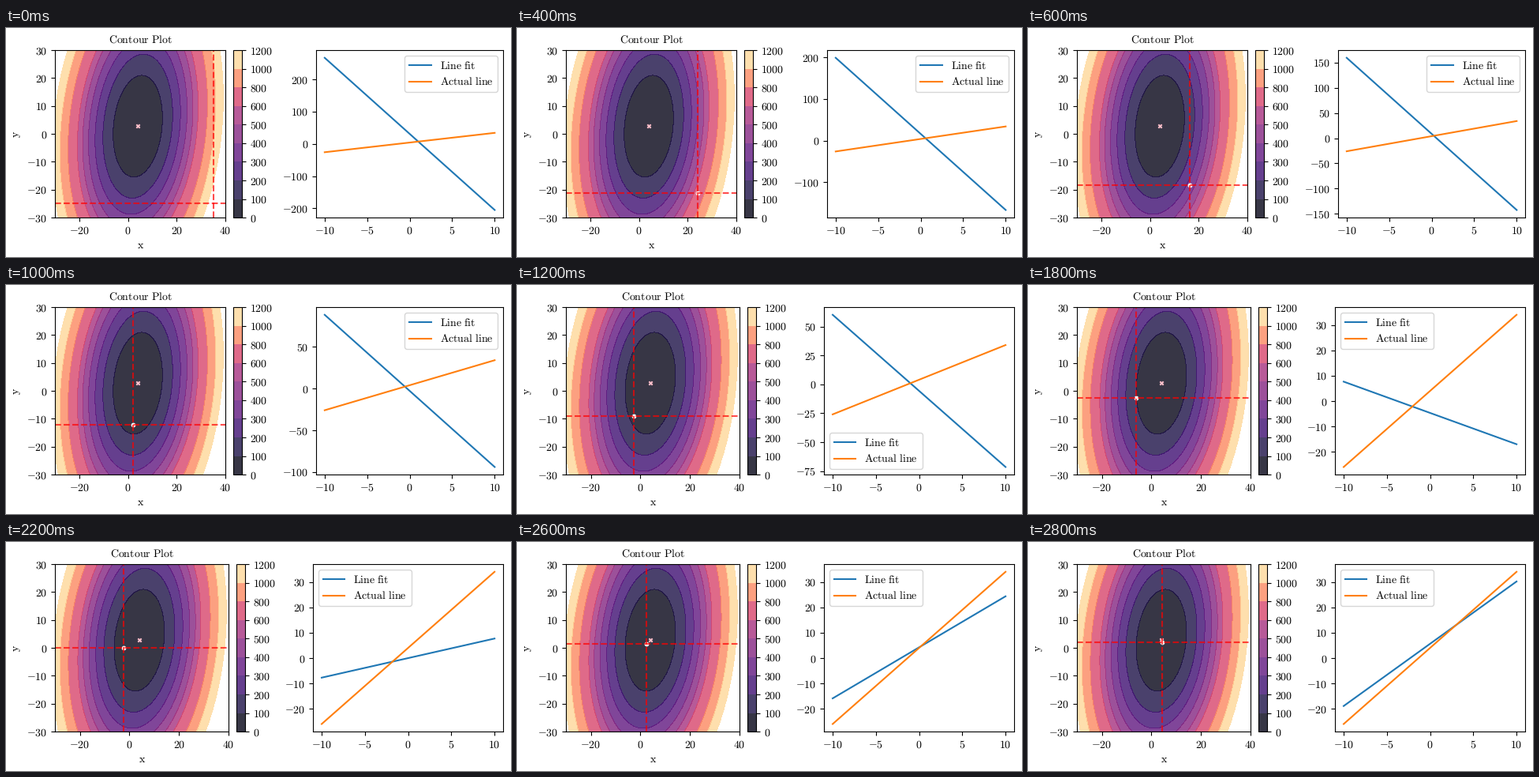
Animation, 640 px wide and 290 px high, one loop 3000 ms. Source, as a matplotlib script:

```python
import numpy as np
import matplotlib.pyplot as plt
from matplotlib.animation import FuncAnimation
from matplotlib.ticker import FuncFormatter

W, H, DPI = 640, 290, 100
FRAMES, INTERVAL = 15, 200
TOP, BOTTOM, RIGHT = 28, 240, 630

plt.rcParams.update({
    "font.family": "Liberation Serif",
    "font.size": 10,
    "axes.titlesize": 10,
    "mathtext.fontset": "cm",
    "text.hinting": "none",
})

# Squared-error bowl over (intercept, slope)
TRUTH = np.array([4.0, 3.0])
CENTER = np.array([4.0, 2.75])
HESS = np.array([[1.0, -0.09], [-0.09, 0.309]])
LEVELS = [0, 100, 200, 300, 400, 500, 600, 800, 1000, 1200]
START, MOMENTUM, RATE = (35.0, -25.0), 0.75, 0.125


def descend(steps):
    pos, vel = np.array(START), np.zeros(2)
    path = [pos]
    for _ in range(steps):
        vel = MOMENTUM * vel - RATE * HESS @ (pos - CENTER)
        pos = pos + vel
        path.append(pos)
    return np.array(path)


def loss(x, y):
    dx, dy = x - CENTER[0], y - CENTER[1]
    return HESS[0, 0] * dx**2 + 2 * HESS[0, 1] * dx * dy + HESS[1, 1] * dy**2


def tex(text):
    return r"$\mathrm{%s}$" % text.replace(" ", r"\ ")


def place(ax, left, right):
    # A small inset keeps the snapped edges on the intended pixels
    ax.set_position([(left + 0.1) / W, (H - BOTTOM - 0.1) / H,
                     (right - left) / W, (BOTTOM - TOP) / H])


number = FuncFormatter(lambda v, _: f"${v + 0.0:g}$")
path = descend(FRAMES)

fig = plt.figure(figsize=(W / DPI, H / DPI), dpi=DPI, facecolor="white")
ax = fig.add_axes([0.1, 0.2, 0.3, 0.7])
cax = fig.add_axes([0.45, 0.2, 0.02, 0.7])
fit_ax = fig.add_axes([0.6, 0.2, 0.35, 0.7])

gx, gy = np.meshgrid(np.linspace(-30, 40, 200), np.linspace(-30, 30, 200))
bowl = ax.contourf(gx, gy, loss(gx, gy), levels=LEVELS, cmap="magma",
                   alpha=0.8, vmin=0, vmax=1200)
bar = fig.colorbar(bowl, cax=cax, ticks=LEVELS, format=number)
bar.minorticks_off()

ax.set(xlim=(-30, 40), ylim=(-30, 30))
ax.set_title(tex("Contour Plot"))
ax.set_xlabel(tex("x"))
ax.set_ylabel(tex("y"))
ax.xaxis.set_major_formatter(number)
ax.yaxis.set_major_formatter(number)

ax.scatter(*TRUTH, s=10, marker="x", color="pink")
dot = ax.scatter(*START, s=10, color="white")
guide = dict(color="r", ls="--", alpha=0.7)
hline = ax.axhline(START[1], **guide)
vline = ax.axvline(START[0], **guide)


def draw_fit(theta):
    xs = np.array([-10.0, 10.0])
    fit_ax.clear()
    fit_ax.plot(xs, theta[0] + theta[1] * xs, label=tex("Line fit"))
    fit_ax.plot(xs, TRUTH[0] + TRUTH[1] * xs, label=tex("Actual line"))
    fit_ax.xaxis.set_major_formatter(number)
    fit_ax.yaxis.set_major_formatter(number)
    fit_ax.legend(loc="best")


def update(i):
    # Three-digit negative labels take 4 px from each panel
    shift = 0 if i < 6 else 4
    place(ax, 62, 278 + shift)
    place(cax, 288 + shift, 299 + shift)
    place(fit_ax, 393 - shift, RIGHT)

    x, y = path[i]
    dot.set_offsets([[x, y]])
    hline.set_ydata([y, y])
    vline.set_xdata([x, x])
    draw_fit(path[i + 1])
    return []


anim = FuncAnimation(fig, update, frames=FRAMES, interval=INTERVAL,
                     init_func=lambda: update(0), repeat=True,
                     repeat_delay=0, blit=False)
plt.show()
```
